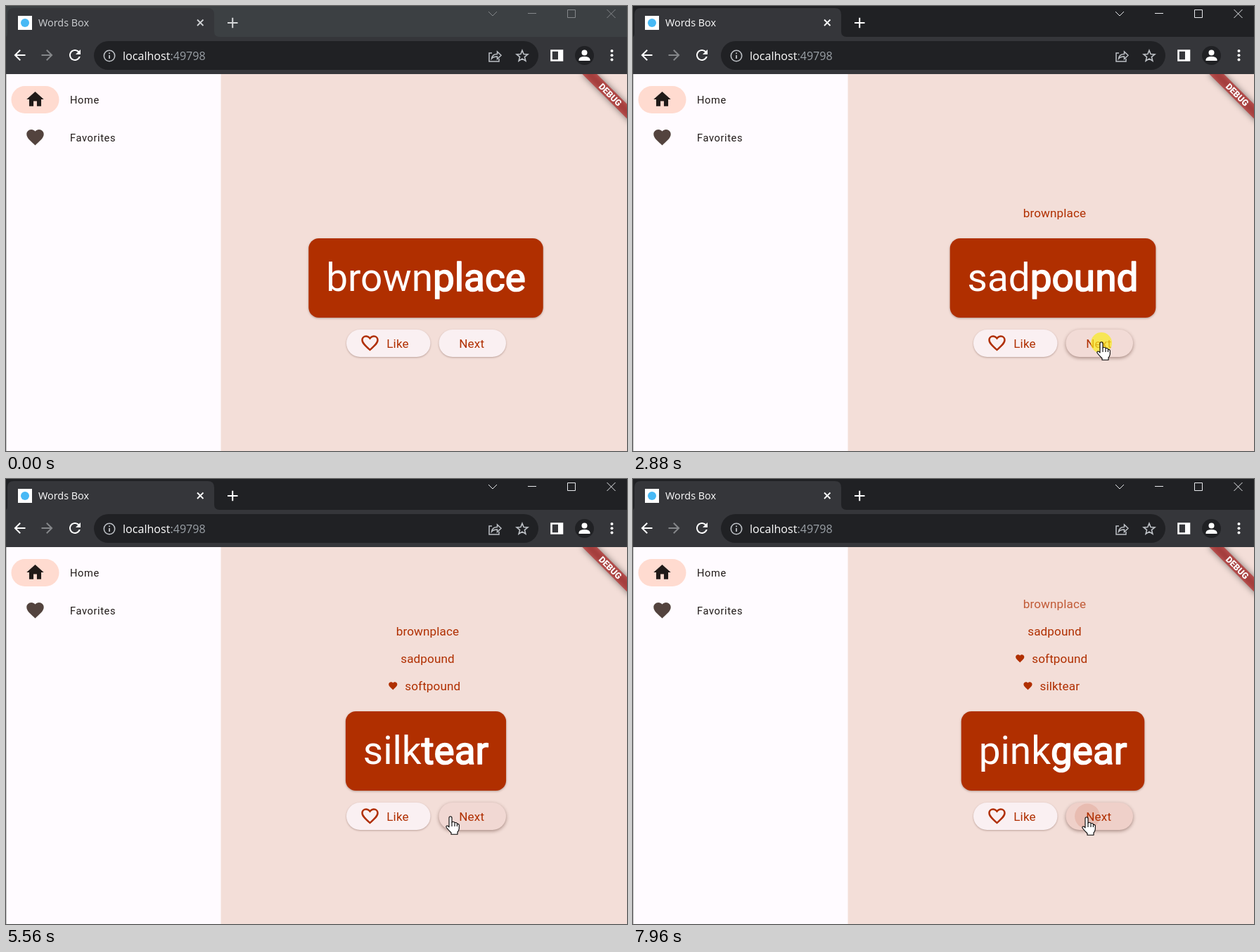
Write an HTML page with a canvas that moves like this. It is 883 px wide and 634 px high and loops after 8000 ms.

```html
<!DOCTYPE html>
<html lang="en">
<head>
<meta charset="utf-8">
<title>Word pairs</title>
<style>
html, body { margin: 0; width: 100%; height: 100%; overflow: hidden; background: #f3ded8; }
canvas { display: block; width: 883px; height: 634px; }
</style>
</head>
<body>
<canvas id="stage" width="883" height="634"></canvas>
<script>
const ctx = document.getElementById('stage').getContext('2d');
const LOOP = 8000;
const S = 1.22; // device scale of the app
const PRIMARY = '#b02f00';
const UI = 'Roboto, sans-serif';
const CHROME = '"Open Sans", sans-serif';
const ROW = 39, LIST_BOTTOM = 314.5, MID = 597, FOCUS_AT = 2030;

const pairs = [
  { a: 'brown', b: 'place', at: -1000 },
  { a: 'sad', b: 'pound', at: 2100 },
  { a: 'soft', b: 'pound', at: 2970, liked: 3722 },
  { a: 'silk', b: 'tear', at: 5205, liked: 6022 },
  { a: 'pink', b: 'gear', at: 7450 }
];
const like = { x: 484, w: 119.5 };
const next = { x: 615.5, w: 95.5 };
const presses = [
  { btn: next, down: 1940, up: 2100, x: 666, glow: true },
  { btn: next, down: 2880, up: 2970, x: 666, glow: true },
  { btn: like, down: 3660, up: 3720, x: 563 },
  { btn: next, down: 5110, up: 5205, x: 632 },
  { btn: like, down: 5950, up: 6020, x: 583 },
  { btn: next, down: 7370, up: 7450, x: 645 },
  { btn: next, down: 7880, up: 9000, x: 646 }
];
// pointer stops: time, x, y
const stops = [
  [310, 765, 592], [520, 684, 450], [920, 684, 450], [1540, 666, 478],
  [3160, 666, 478], [3630, 561, 475], [4130, 561, 475], [4480, 611, 487],
  [4550, 611, 487], [4900, 632, 480], [5600, 632, 480], [5900, 583, 478],
  [6530, 583, 478], [6670, 590, 479], [6950, 609, 488], [7280, 645, 481]
];

const HEART = new Path2D('M12 21.35l-1.45-1.32C5.4 15.36 2 12.28 2 8.5 2 5.42 4.42 3 7.5 3c1.74 0 3.41.81 4.5 2.09C13.09 3.81 14.76 3 16.5 3 19.58 3 22 5.42 22 8.5c0 3.78-3.4 6.86-8.55 11.54z');
const HOME = new Path2D('M10 20v-6h4v6h5v-8h3L12 3 2 12h3v8z');
const ARROW = new Path2D('M20 11H7.83l5.59-5.59L12 4l-8 8 8 8 1.41-1.41L7.83 13H20z');
const RELOAD = new Path2D('M17.65 6.35C16.2 4.9 14.21 4 12 4c-4.42 0-7.99 3.58-7.99 8s3.57 8 7.99 8c3.73 0 6.84-2.55 7.73-6h-2.08c-.82 2.33-3.04 4-5.65 4-3.31 0-6-2.69-6-6s2.69-6 6-6c1.66 0 3.14.69 4.22 1.78L13 11h7V4z');
const HAND = new Path2D('M5 16V3Q5 .8 7 .8T9 3V9Q9.5 8 11 8.3 13 8.5 13 10 14 9 15.5 9.8 16.5 10.3 16.5 11.5 18.8 11 19.3 13V18Q19 21 17 23V26.3H8V24Q4 20 1.2 16.5 .3 14.5 2 14 3.5 13.7 5 16Z');
const FINGERS = new Path2D('M9 9v6M13 10.5v4.5M16.4 11.8v3.2');
const POINTER = new Path2D('M.5.5V16.5L4.2 13 6.6 18.5 9 17.4 6.6 12H12Z');

const clamp = v => Math.max(0, Math.min(1, v));
const mix = (a, b, k) => a + (b - a) * k;
const smooth = k => k * k * (3 - 2 * k);

// the standard "ease" curve, solved by bisection
function ease(x) {
  x = clamp(x);
  let lo = 0, hi = 1;
  for (let i = 0; i < 14; i++) {
    const u = (lo + hi) / 2;
    if (.75 * u * (1 - u) + u * u * u < x) lo = u; else hi = u;
  }
  return .3 * lo * (1 - lo) ** 2 + 3 * lo * lo * (1 - lo) + lo ** 3;
}

function rgb(from, to, k) {
  return `rgb(${from.map((v, i) => Math.round(mix(v, to[i], k)))})`;
}

function box(x, y, w, h, color, r = 0) {
  ctx.fillStyle = color;
  ctx.beginPath();
  ctx.roundRect(x, y, w, h, r);
  ctx.fill();
}

function disc(x, y, r, color) {
  ctx.fillStyle = color;
  ctx.beginPath();
  ctx.arc(x, y, r, 0, 7);
  ctx.fill();
}

function line(d, color, width = 1) {
  ctx.strokeStyle = color;
  ctx.lineWidth = width;
  ctx.stroke(new Path2D(d));
}

function text(str, x, y, font, color, spacing = 0) {
  ctx.font = font;
  ctx.letterSpacing = spacing + 'px';
  ctx.fillStyle = color;
  ctx.fillText(str, x, y);
}

function widthOf(str, font, spacing = 0) {
  ctx.font = font;
  ctx.letterSpacing = spacing + 'px';
  return ctx.measureText(str).width;
}

// 24-unit icon centred on a point
function icon(path, x, y, scale, color, outline) {
  ctx.save();
  ctx.translate(x, y);
  ctx.scale(scale, Math.abs(scale));
  ctx.translate(-12, -12);
  if (outline) {
    ctx.clip(path);
    ctx.strokeStyle = color;
    ctx.lineWidth = 4;
    ctx.stroke(path);
  } else {
    ctx.fillStyle = color;
    ctx.fill(path);
  }
  ctx.restore();
}

function withShadow(dy, blur, alpha, draw) {
  ctx.save();
  ctx.shadowColor = `rgba(60,20,10,${alpha})`;
  ctx.shadowOffsetY = dy;
  ctx.shadowBlur = blur;
  draw();
  ctx.restore();
}

function drawBrowser(focused) {
  const bright = focused ? '#fff' : '#cfd1d4';
  const frame = focused ? '#e8eaed' : '#85888b';
  box(0, 0, 883, 46, focused ? '#202124' : '#3c4043');
  box(0, 44, 883, 53, '#35363a');
  ctx.fill(new Path2D('M0 44Q2 43 2 38V12Q2 3 11 3H287Q296 3 296 12V36Q296 44 304 44Z'));

  box(17, 14, 20, 20, '#fff');
  disc(27, 24, 6, '#47b9f5');
  text('Words Box', 46, 28.5, '14.4px ' + CHROME, bright);
  line('M272 19.5l8.5 8.5M280.500 19.500l-8.5 8.500', bright, 1.8);
  line('M315 24h14.500M322.200 16.700v14.500', focused ? '#fff' : '#d5d7d9', 2);

  line('M686 8l6 6 6-6M742 10.500h12M798.500 5.500h11v11h-11zM854.500 5l12 12M866.500 5l-12 12', frame);

  icon(ARROW, 19.5, 70, 1, '#fff');
  icon(ARROW, 58.5, 70, -1, '#85878a');
  icon(RELOAD, 98, 70, 1, '#fff');
  box(125, 50, 632, 41, '#202124', 20.5);

  const grey = '#bdc1c6';
  ctx.strokeStyle = grey;
  ctx.lineWidth = 1.6;
  ctx.beginPath();
  ctx.arc(147, 71, 7.7, 0, 7);
  ctx.stroke();
  line('M147 70v5M147 66.500v1.800', grey, 1.8);

  const font = '16.1px ' + CHROME;
  text('localhost', 166, 76.5, font, '#fff');
  text(':49798', 166 + widthOf('localhost', font), 76.5, font, '#9aa0a6');

  line('M691 67h-4v12h14v-4M690.500 75Q691.500 68.500 698.500 68.500V65L704 70.300 698.500 75.500V72Q693 72 690.500 75Z', grey, 1.5);

  ctx.beginPath();
  for (let i = 0; i < 10; i++) {
    const r = i % 2 ? 3.6 : 8.3, a = i * Math.PI / 5;
    ctx.lineTo(734 + r * Math.sin(a), 71.5 - r * Math.cos(a));
  }
  ctx.closePath();
  ctx.strokeStyle = grey;
  ctx.lineWidth = 1.6;
  ctx.stroke();

  line('M775.500 63.500h15.500v14h-15.500z', '#fff', 2.6);
  box(785, 63, 6, 15, '#fff');
  disc(822.5, 70.5, 13.5, '#202124');
  disc(822.5, 66.5, 4, '#fff');
  ctx.fill(new Path2D('M814.500 78v-2q1-4 8-4t8 4v2z'));
  for (const y of [64, 70.3, 76.6]) disc(861.5, y, 2, '#fff');
}

function drawRail() {
  box(0, 97, 305.5, 537, '#fffbff');
  box(0, 97, 1, 537, '#c4c1c4');
  box(7.5, 114, 68, 39, '#ffdbd0', 19.5);
  icon(HOME, 41.5, 133, S, '#201a18');
  icon(HEART, 41.5, 187, S, '#53433e');
  const font = 12 * S + 'px ' + UI;
  text('Home', 91, 138.5, font, '#201a18', .5 * S);
  text('Favorites', 91, 192.5, font, '#201a18', .5 * S);
}

function drawBanner() {
  ctx.save();
  ctx.beginPath();
  ctx.rect(306, 97, 577, 537);
  ctx.clip();
  ctx.translate(888.5, 97);
  ctx.rotate(Math.PI / 4);
  ctx.scale(S, S);
  ctx.filter = 'blur(4.8px)';
  box(-40, 28, 80, 12, 'rgba(0,0,0,.5)');
  ctx.filter = 'none';
  box(-40, 28, 80, 12, 'rgba(183,28,28,.627)');
  ctx.textAlign = 'center';
  text('DEBUG', 0, 37.6, '900 10.2px ' + UI, '#fff');
  ctx.restore();
}

function drawHistory(t, current) {
  const font = 14 * S + 'px ' + UI;
  let bottom = LIST_BOTTOM;
  for (let i = current - 1; i >= 0; i--) {
    const p = pairs[i];
    const h = ROW * clamp((t - pairs[i + 1].at) / 300);
    const y = bottom - h / 2;
    const name = p.a + p.b;
    const heart = p.liked ? 12 * S : 0;
    const gap = 8 * S;
    const left = 594.6 - (heart + gap + widthOf(name, font, .1 * S)) / 2;
    ctx.save();
    ctx.beginPath();
    ctx.rect(306, bottom - h, 577, h);
    ctx.clip();
    ctx.globalAlpha = clamp((y - 97) / 108);
    if (heart) icon(HEART, left + heart / 2, y - .3, S / 2, PRIMARY);
    text(name, left + heart + gap, y + 5.6, font, PRIMARY, .1 * S);
    ctx.restore();
    bottom -= h;
  }
}

function drawCard(t, current) {
  const font = 45 * S + 'px ' + UI;
  const size = p => widthOf(p.a, font) + widthOf(p.b, font);
  const p = pairs[current];
  const full = size(p);
  const old = current ? size(pairs[current - 1]) : full;
  const w = mix(old, full, clamp((t - p.at) / 200));
  const pad = 20 * S + .5;

  withShadow(1, 3, .35, () => box(MID - w / 2 - pad, 331, w + 2 * pad, 113, PRIMARY, 14.6));
  ctx.save();
  ctx.beginPath();
  ctx.rect(MID - w / 2 - 1, 331, w + 2, 113);
  ctx.clip();
  const x = MID - full / 2;
  text(p.a, x, 406, font, '#fff');
  const bx = x + widthOf(p.a, font);
  text(p.b, bx, 406, font, '#fff');
  ctx.strokeStyle = '#fff';
  ctx.lineWidth = 1.72;
  ctx.lineJoin = 'round';
  ctx.strokeText(p.b, bx, 406);
  ctx.restore();
}

function pointerAt(t) {
  let i = stops.length - 1;
  while (i > 0 && stops[i][0] > t) i--;
  const a = stops[i], b = stops[i + 1] || a;
  const k = a === b ? 0 : smooth(clamp((t - a[0]) / (b[0] - a[0])));
  return { x: mix(a[1], b[1], k), y: mix(a[2], b[2], k), shown: t >= stops[0][0] };
}

function isOver(btn, p) {
  return p.shown && p.x >= btn.x && p.x <= btn.x + btn.w && p.y >= 461 && p.y <= 500;
}

// share of the last 120 ms that the pointer spent on the button
function hoverOf(btn, t) {
  let n = 0;
  for (let i = 0; i < 12; i++) n += isOver(btn, pointerAt(t - i * 10));
  return n / 12;
}

function drawRipple(p, t) {
  const { btn } = p;
  const full = Math.hypot(btn.w, ROW) / 2;
  const grow = at => full * mix(.3, 1, ease((at - p.down) / 1000));
  const k = ease((t - p.up) / 225);
  const r = t < p.up ? grow(t) : mix(grow(p.up), full + 5, k);
  const x = mix(p.x, btn.x + btn.w / 2, k);
  const shade = clamp((t - p.down) / 75);
  const fade = 1 - clamp((t - p.up - 225) / 150);
  const held = shade * (1 - clamp((t - p.up) / 60));
  box(btn.x, 461, btn.w, ROW, `rgba(176,47,0,${.06 * held})`, ROW / 2);
  ctx.save();
  ctx.beginPath();
  ctx.roundRect(btn.x, 461, btn.w, ROW, ROW / 2);
  ctx.clip();
  disc(x, 480.5, r, `rgba(176,47,0,${.12 * shade * fade})`);
  ctx.restore();
}

function drawButton(btn, t) {
  const k = hoverOf(btn, t);
  const color = rgb([250, 240, 242], [242, 219, 214], k);
  withShadow(mix(1, 1.8, k), mix(2.5, 5, k), mix(.3, .42, k),
    () => box(btn.x, 461, btn.w, ROW, color, ROW / 2));
  for (const p of presses) {
    if (p.btn === btn && t >= p.down && t < p.up + 375) drawRipple(p, t);
  }
}

function drawButtons(t, current) {
  const font = 14 * S + 'px ' + UI;
  drawButton(like, t);
  drawButton(next, t);
  icon(HEART, 517.5, 480.2, S, PRIMARY, !(t >= pairs[current].liked));
  text('Like', 541.3, 486.5, font, PRIMARY, .1 * S);
  text('Next', 644.3, 486.5, font, PRIMARY, .1 * S);
}

function drawPointer(t) {
  for (const p of presses) {
    if (!p.glow || t < p.down) continue;
    const fade = 1 - clamp((t - p.down - 300) / 240);
    disc(p.x, 480, 15, `rgba(250,235,30,${.7 * fade})`);
  }
  const p = pointerAt(t);
  if (!p.shown) return;
  const hand = isOver(like, p) || isOver(next, p);
  ctx.save();
  ctx.translate(p.x - (hand ? 7 : 0), p.y);
  ctx.fillStyle = '#fff';
  ctx.strokeStyle = '#000';
  ctx.lineWidth = 1.1;
  ctx.lineJoin = 'round';
  const shape = hand ? HAND : POINTER;
  ctx.fill(shape);
  ctx.stroke(shape);
  if (hand) ctx.stroke(FINGERS);
  ctx.restore();
}

function draw(t) {
  let current = pairs.length - 1;
  while (pairs[current].at > t) current--;
  box(0, 0, 883, 634, '#f3ded8');
  drawBrowser(t >= FOCUS_AT);
  drawRail();
  drawHistory(t, current);
  drawCard(t, current);
  drawButtons(t, current);
  drawBanner();
  drawPointer(t);
}

const start = performance.now();
function tick() {
  draw((performance.now() - start) % LOOP);
  requestAnimationFrame(tick);
}
tick();
</script>
</body>
</html>
```
